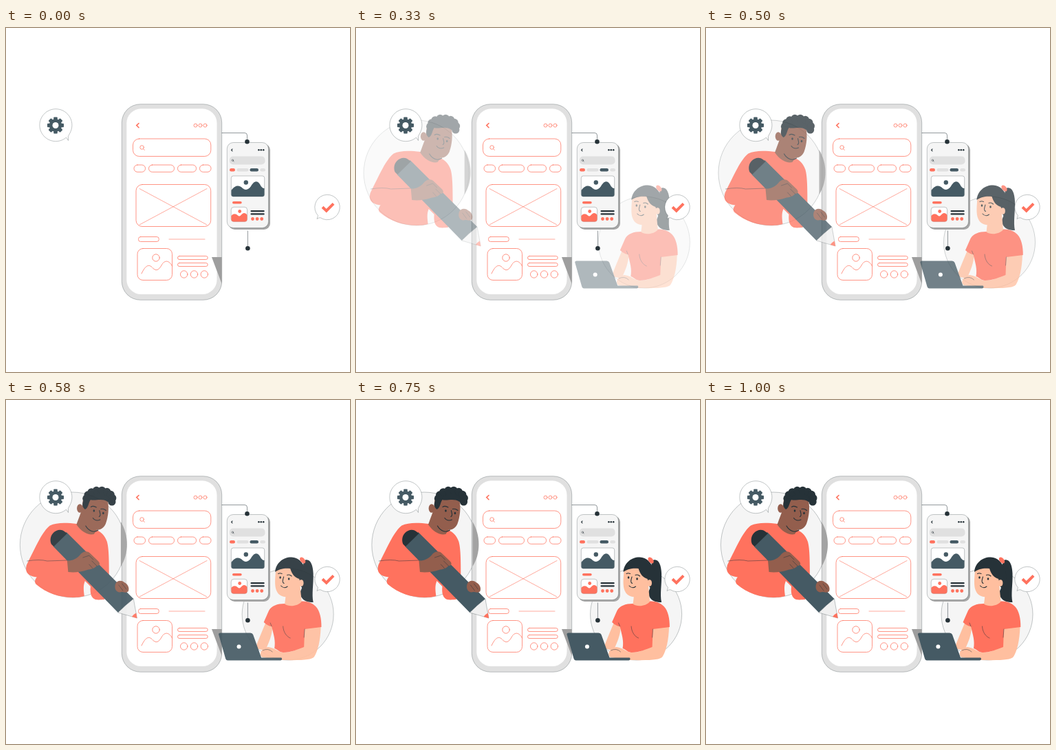
An HTML page for the animation above (1.04 s loop, 500x500 px).

```html
<!DOCTYPE html>
<html lang="en">
<head>
<meta charset="utf-8">
<title>App wireframe</title>
<style>
  html, body { margin: 0; width: 100%; height: 100%; overflow: hidden; background: #fff; }
  svg { display: block; width: 100%; height: 100%; }
  .red { fill: #ff725e; }
  .slate { fill: #455a64; }
  .ink { fill: #263238; }
  .pale { fill: #e0e0e0; }
  .disc { fill: #f5f5f5; }
  .white { fill: #fff; }
  .brown { fill: #935e4d; }
  .skin { fill: #ffbf9f; }
  .hair { stroke: #263238; stroke-width: .4; stroke-opacity: .7; }
  .line { fill: none; stroke: #263238; stroke-width: .5; stroke-linecap: round; stroke-linejoin: round; }
  .wire { fill: none; stroke: #ff725e; stroke-width: .75; stroke-linecap: round; }
  .line.bold { stroke-width: 1.1; }
  .wire .thick { stroke-width: 1.6; }
  .fade { opacity: 0; }
</style>
</head>
<body>
<svg viewBox="0 0 500 500">
  <!-- discs behind the people -->
  <g class="fade" data-side="1"><circle class="disc hair" cx="98" cy="210.5" r="76.5"/></g>
  <g class="fade" data-side="-1"><circle class="disc hair" cx="408.5" cy="311.5" r="66.5"/></g>

  <!-- large phone -->
  <rect class="pale hair" x="168.3" y="110.7" width="145.4" height="284.6" rx="27"/>
  <rect class="white" x="175.3" y="117.3" width="131.2" height="269.7" rx="21"/>
  <g class="wire" id="wires">
    <path class="thick" d="M193 138.5L189.8 141.6L193 144.7"/>
    <rect x="184.5" y="161" width="113.3" height="25.5" rx="9"/>
    <circle cx="197.6" cy="173.5" r="2.8"/>
    <path d="M199.7 175.8L201.3 177.5"/>
    <rect x="189" y="227.5" width="108.7" height="61" rx="9"/>
    <path stroke-opacity=".8" d="M194 233.5L292 286M292 233.5L194 286M237 307H289"/>
    <rect x="192.5" y="303.5" width="29.7" height="7" rx="3"/>
    <rect x="191" y="320.5" width="50.5" height="46" rx="8"/>
    <circle cx="218" cy="334" r="5.2"/>
    <path d="M197 357C203 344 208 343 213 348.5C218 354 222 352 226 345C230 337 237 337 241.5 346"/>
  </g>
  <path d="M299 333H313.7V372Z" fill="#9e9e9e"/>

  <!-- small phone -->
  <rect x="323.5" y="168.5" width="60.5" height="124.5" rx="9" fill="#a6a6a6"/>
  <rect class="disc hair" x="321.3" y="166.5" width="60.2" height="124" rx="9"/>
  <path class="line bold" d="M329 176L327.5 177.4L329 178.8"/>
  <rect class="pale" x="325" y="186.5" width="51.5" height="12" rx="5"/>
  <circle class="line" cx="329.4" cy="192.3" r="1.2"/>
  <path class="line" d="M330.3 193.2L331.3 194.2"/>
  <rect class="red" x="325" y="204" width="8" height="4.6" rx="2.3"/>
  <rect class="pale" x="335.5" y="204" width="17" height="4.6" rx="2.3"/>
  <rect class="slate" x="354.5" y="204" width="12.5" height="4.6" rx="2.3"/>
  <rect class="pale" x="369.5" y="204" width="7.5" height="4.6" rx="2.3"/>
  <rect class="white hair" x="327.3" y="215" width="48.4" height="30" rx="3"/>
  <circle class="slate" cx="348.8" cy="224.5" r="3.2"/>
  <path class="slate" d="M327.5 236C334 227 340 229 344 233C349 237 353 234 356 230C361 221 366 222 369 227C371 231 373 233 375.5 233V242Q375.5 245 372.5 245H330.5Q327.5 245 327.5 242Z"/>
  <rect class="red" x="329" y="252" width="13.7" height="3.6" rx="1.8"/>
  <rect class="white hair" x="327.2" y="260.3" width="23.4" height="21.2" rx="4"/>
  <circle class="red" cx="339.7" cy="266.5" r="2.4"/>
  <path class="red" d="M327.4 273C331 269 334 270 337 272.5C341 276 342 269 346 269Q349 269 350.5 272V278Q350.5 281.4 347 281.4H331Q327.4 281.4 327.4 278Z"/>
  <rect class="ink" x="355.5" y="265" width="20.2" height="2.3" rx="1"/>
  <rect class="ink" x="355.5" y="269.3" width="20.2" height="2.3" rx="1"/>
  <g class="red" id="redDots"></g>
  <g class="ink" id="inkDots"></g>
  <path class="line" d="M314 152.5H347Q350.5 152.5 350.5 156V165M351.4 295V320"/>
  <circle class="ink" cx="350.5" cy="165.3" r="3.3"/>
  <circle class="ink" cx="351.4" cy="320.2" r="3.3"/>

  <!-- woman -->
  <g class="fade" data-side="-1">
    <path class="ink" d="M431 234C440 228 445 238 445.5 252C446 268 443 282 445.5 294C437 294 428 292 426 280C432 268 434 255 431 240Z"/>
    <path class="skin" d="M377 322L386 329C386 342 381 352 376 364L361 361C366 348 371 336 377 322Z"/>
    <path class="skin" d="M433 332L456.5 329C456 350 452 365 447 373C443 378 430 378.500 400 378L371 374C365 368 372 360 380 359C390 360 395 367 402 367C415 367 425 362 430 356Z"/>
    <path class="red" d="M404 296C393 296 385 299 381 306L373.5 323C378 327 382 329 385 329C388 342 391 350 389 361C394 363 397 367 402 367C413 367 424 362 432 359L433 333L457.3 330C457.5 318 455 306 449 300C443 294 436 292.5 428 292.5Z"/>
    <path class="skin" d="M406 280L404 296.5C410 301 423 300 428.5 293L426 266Z"/>
    <path class="skin" d="M391 247C390 260 389 270 392 277C395 285 404 288 411 285C420 281 426 273 428 262L424 238C412 232 396 235 391 247Z"/>
    <path class="ink" d="M390 250C391 236 403 228 414 228.5C424 229 430 236 434 245C438 256 437 266 431 274C426 272 427 265 425 260C418 258 414 252 412 245C405 244 396 245 390 250Z"/>
    <ellipse class="skin" cx="428" cy="266" rx="3.4" ry="4.7"/>
    <ellipse class="red" cx="430" cy="233" rx="5.2" ry="3.2" transform="rotate(50 430 233)"/>
    <ellipse class="ink" cx="397.5" cy="258" rx="1.3" ry="1.8"/>
    <ellipse class="ink" cx="410" cy="260" rx="1.3" ry="1.8"/>
    <path class="line bold" d="M394.5 252.5Q397 251 400 252.5M407.5 254.5Q411 253 414 256M402.5 257C401 262 400 265 403 266.5M398.5 270Q403 275 408 271"/>
    <path class="line" d="M401.5 329C402 338 407 344 412 346M433 333L432 345M385 329L383 324M372 364Q380 360 386 366"/>
    <path class="slate" d="M310.5 338.5H354Q357 338.5 358 341L370 374.5H399Q400 375 400 376.5T398 378.5H321Q319 378.5 318 376L308 341Q307.5 338.5 310.5 338.5Z"/>
    <circle class="white" cx="337.4" cy="358.5" r="3"/>
  </g>

  <!-- man -->
  <g class="fade" data-side="1">
    <path d="M168 177C180 197 180 223 168 242Z" fill="#a3a3a3"/>
    <path class="red" d="M104 180C88 178 74 178 65 182.5C54 191 45 212 31 240C28 251 34 256 46 257.500C43 261 42 265 45 268C60 281 80 287 98 287C106 287 112 286 115 285C114 277 113 270 116 263L124 271C123 281 125 288 131 290C136 291 141 290 144 290L151 270C151 235 151 217 148 206C144 195 138 191 130 188Z"/>
    <path class="brown" d="M112 158L103.5 181C111 192 121 197 129 195L136 184Z"/>
    <ellipse class="brown" cx="108.5" cy="157.5" rx="4.3" ry="6.3"/>
    <path class="brown" d="M113 145C124 140 138 140 149 146C151 156 150 169 146 180C142 190 131 191 124 185C117 180 112 172 111 162Z"/>
    <path class="line bold" d="M117 183C121 190 129 194 135 189"/>
    <path class="ink" d="M113 148C115 138 125 131 138 130C150 131 158 140 158 150L149 148C141 142 131 147 124 145C121 149 121 157 116 159C112 156 112 152 113 148Z"/>
    <g class="ink" id="curls"></g>
    <ellipse class="ink" cx="129" cy="161" rx="1.3" ry="1.8"/>
    <ellipse class="ink" cx="142.500" cy="164.500" rx="1.3" ry="1.8"/>
    <path class="line bold" d="M124.5 155.5Q128 153 132.5 156M139 158.5Q143 157.5 146.500 160.500M137 160.500C137.500 165 140 168 136.500 169.500M127.500 171.500Q131.500 177 138 174"/>
    <path class="line" d="M32 234Q50 231 61 234L90 233"/>
    <path class="slate" d="M89 192L186.5 289Q175 298 164 309L70 213Z"/>
    <path class="ink" d="M90 194L86 191C81 187 74 189 70 193C65 198 65 205 67 209.500L70.500 213Z"/>
    <path class="hair" d="M186.5 289L191.5 317L164 309Q175 298 186.5 289Z" fill="#f0f0f0"/>
    <path class="red" d="M190.3 309.5L191.7 317.3L184 315Q186.5 311.5 190.3 309.5Z"/>
    <path class="brown" d="M90 233.5C97 234 103 231 108 226C112 220 119 218.5 123 222.5L135 234C139 238 137 241 133 241C130 245 124 246 119 247C111 250 100 251 91.5 250Z"/>
    <path class="line" d="M113 229L122 226L128 232M126 234L133 241M122 239L127 244.5"/>
    <path class="brown" d="M160 268C162 262 169 261.5 173 265C178 267 181 273 179 278C176 281 172 279 169 279C163 281 158 276 160 268Z"/>
    <path class="line" d="M165 269L171 277M170 267L176 275"/>
  </g>

  <!-- bubbles -->
  <path class="white hair" d="M90.5 163.5L87.5 159.2A23.5 23.5 0 1 1 93 152.5Q89 157 90.5 163.5Z"/>
  <g class="slate" id="gear" transform="translate(72 141.5)"></g>
  <path class="white hair" d="M452 277.5L453.5 272.7A18.2 18.2 0 1 1 457 275.7Q454.5 275.5 452 277.5Z"/>
  <path d="M460 260.3L465.7 265.7L476 255.3" fill="none" stroke="#ff725e" stroke-width="4"/>
</svg>
<script>
  const NS = "http://www.w3.org/2000/svg";
  const add = (id, tag, attrs) => {
    const el = document.createElementNS(NS, tag);
    for (const key in attrs) el.setAttribute(key, attrs[key]);
    document.getElementById(id).append(el);
  };
  const dots = (id, x, cy, gap, r) => {
    for (let i = 0; i < 3; i++) add(id, "circle", { cx: x + i * gap, cy, r });
  };

  dots("wires", 275.5, 141.6, 7, 2.5);
  dots("wires", 258.7, 358, 14.8, 5.2);
  dots("redDots", 358.5, 277.5, 6.6, 2.4);
  dots("inkDots", 367.4, 177.3, 3.4, 1.3);

  // filter pills, then two text bars
  let x = 186;
  for (const width of [16.5, 37, 27, 16.5]) {
    add("wires", "rect", { x, y: 199, width, height: 10.3, rx: 5 });
    x += width + 5;
  }
  for (const y of [331.5, 341.5])
    add("wires", "rect", { x: 249.5, y, width: 43.7, height: 5, rx: 2.5 });

  // curls along an arc from ear to forehead
  for (let i = 0; i < 9; i++) {
    const a = Math.PI * (1.02 + i * .135);
    add("curls", "circle", { cx: 137 + 19 * Math.cos(a), cy: 144 + 13 * Math.sin(a), r: 5.6 });
  }

  for (let i = 0; i < 8; i++)
    add("gear", "rect", { x: -2.8, y: -12, width: 5.6, height: 6, rx: 1, transform: `rotate(${i * 45})` });
  add("gear", "circle", { r: 9.2 });
  add("gear", "circle", { r: 4.5, class: "white" });

  const LOOP = 1040, TICK = 1000 / 24, BEGIN = 115, END = 1000, FADE = 510;
  const people = document.querySelectorAll(".fade");

  // 24 steps a second, each starting on a whole hundredth
  function stepTime(t) {
    let n = 0;
    while (Math.round((n + 1) * TICK / 10) * 10 <= t) n++;
    return n * TICK;
  }

  // slides in, passes its place slightly, then settles back
  function shiftAt(t) {
    const p = Math.min(1, Math.max(0, (t - BEGIN) / (END - BEGIN)));
    return 23.5 * (p - 1) * (1 - p / .59);
  }

  const start = performance.now();
  function draw() {
    const t = stepTime((performance.now() - start) % LOOP);
    const alpha = Math.min(1, Math.max(0, (t - BEGIN) / FADE));
    for (const el of people) {
      el.style.opacity = alpha;
      el.setAttribute("transform", `translate(${shiftAt(t) * el.dataset.side} 0)`);
    }
    requestAnimationFrame(draw);
  }
  draw();
</script>
</body>
</html>
```
